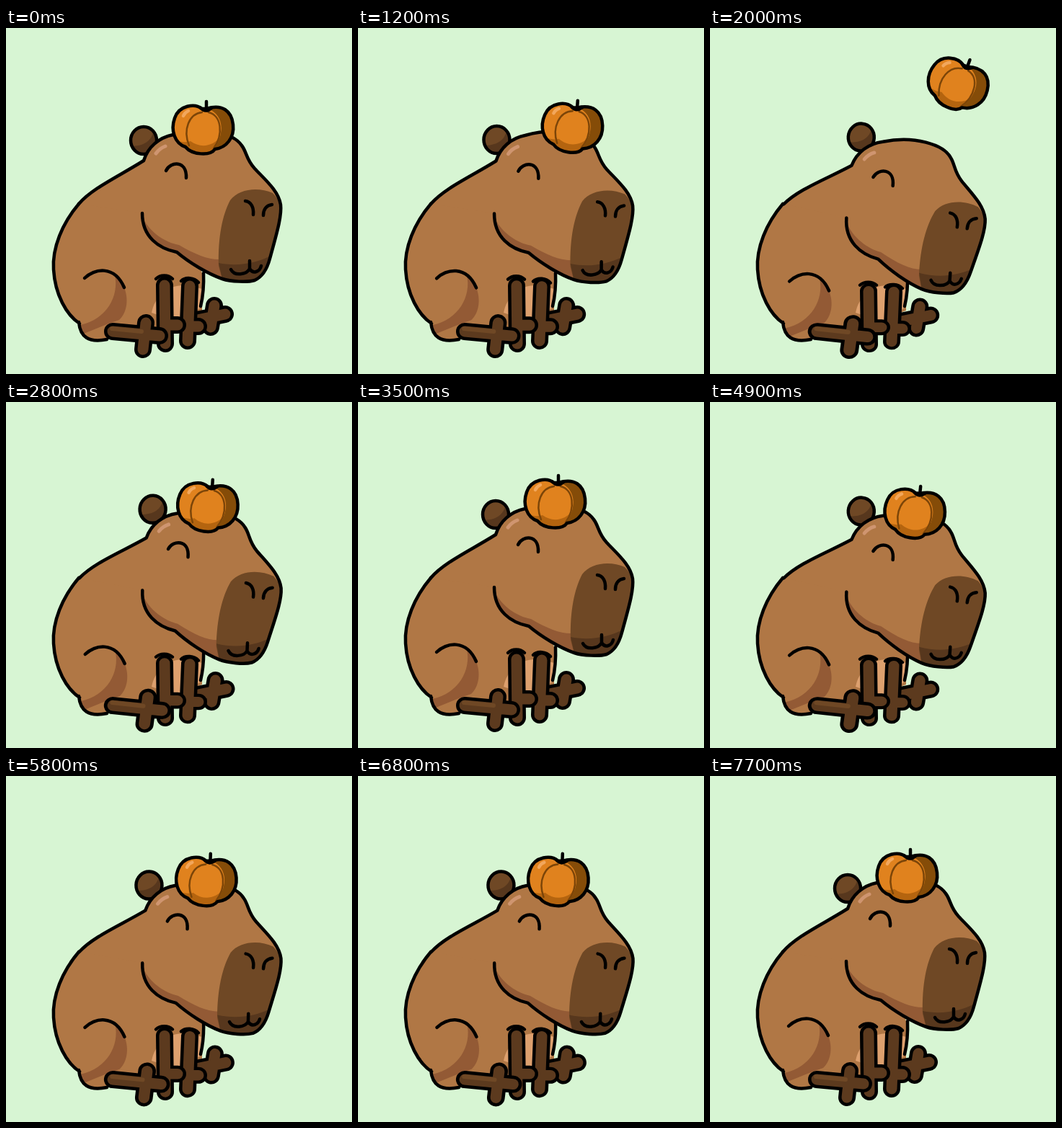
An HTML page without scripts that plays this animation: 480x480 px, repeating every 7900 ms.

```html
<!DOCTYPE html>
<html lang="en">
<head>
<meta charset="utf-8">
<title>Capybara and pumpkin</title>
<style>
@property --p { syntax: "<number>"; inherits: true; initial-value: 0; }
@property --x { syntax: "<number>"; inherits: true; initial-value: 0; }
@property --y { syntax: "<number>"; inherits: true; initial-value: 0; }
@property --r { syntax: "<number>"; inherits: true; initial-value: 0; }

html, body { margin: 0; width: 100%; height: 100%; overflow: hidden; background: #d7f5d3; }
svg {
  display: block; width: 100vw; height: 100vh;
  fill: none; stroke-linecap: round; stroke-linejoin: round;
  animation: bob 7.9s step-end infinite, toss 7.9s step-end infinite;
}
.ink { stroke: #000; stroke-width: 4.5; }
.fur { fill: #b07745; }
.belly { fill: #dda06e; }
.shade { fill: #935a35; }
.dark { fill: #6f4825; }
.deep { fill: #57371d; }
.peel { fill: #e0821e; }
.peel-low { fill: #b4640f; }
.peel-dark { fill: #854c08; }
.limb { stroke: #000; stroke-width: 24; }
.limb + .limb { stroke: #5c3a1e; stroke-width: 15; }

/* --p is how far the head has dipped, 0 to 1 */
.head { transform-origin: 98px 265px; transform: rotate(calc(var(--p) * 5.4deg)); }
.ear { transform: translate(calc(var(--p) * 14px), calc(min(1, var(--p) * 2) * -12px)); }
.legs { transform-origin: 240px 450px; transform: scaleY(calc(1 - var(--p) * .114)); }
.hind { transform-origin: 140px 420px; transform: rotate(calc(var(--p) * 1.5deg)) scaleX(calc(1 + var(--p) * .1)); }
.far { transform: translate(calc(var(--p) * 3px), calc(var(--p) * 2px)); }
.haunch { transform: translate(calc(var(--p) * 1.5px), calc(var(--p) * 6px)); }
.pumpkin {
  transform-origin: 273px 140px;
  transform: translate(calc((var(--x) + var(--p) * 3) * 1px), calc((var(--y) + var(--p) * 2) * 1px))
    rotate(calc((var(--r) + var(--p) * 2) * 1deg));
}

@keyframes bob {
  0%, 12.6%, 20.2%, 32.9%, 44.3%, 56.9%, 70.8%, 83.5%, 97.4% { --p: 0; }
  15.1%, 17.7% { --p: .06; }
  2.5%, 22.7%, 46.8%, 59.4%, 73.4%, 86% { --p: .3; }
  5%, 25.3%, 37.9%, 49.3%, 62%, 75.9%, 88.6% { --p: .75; }
  7.5%, 27.8%, 40.5%, 51.8%, 64.5%, 78.4%, 91.1% { --p: 1; }
  10.1%, 30.3%, 35.4%, 41.7%, 54.4%, 68.3%, 81%, 94.9% { --p: .5; }
}
@keyframes toss {
  0%, 32.9%, 37.9% { --x: 0; --y: 0; --r: 0; }
  12.6% { --x: 8; --y: -1; --r: 1; }
  15.1% { --x: 23; --y: -3; --r: 4; }
  17.7% { --x: 42; --y: -36; --r: 10; }
  20.2% { --x: 60; --y: -72; --r: 16; }
  22.7% { --x: 68; --y: -86; --r: 18; }
  25.3% { --x: 54; --y: -80; --r: 14; }
  27.8% { --x: 34; --y: -48; --r: 8; }
  30.3% { --x: 14; --y: -14; --r: 3; }
  35.4% { --x: -1; --y: -4; --r: 0; }
}
</style>
</head>
<body>
<svg viewBox="0 0 480 480" preserveAspectRatio="none">
  <defs>
    <path id="farFoot" d="M265 405L304 397M289 385L284 415"/>
    <path id="rightLeg" d="M255 358L252 434M258 414H267"/>
    <path id="leftLeg" d="M220 357L221 438M224 412H238"/>
    <path id="hindFoot" d="M148 421L213 427M194 409L190 446"/>
    <path id="headShape" d="M101 244C120 222 156 206 191 184C197 165 212 152 232 148C275 136 316 146 327 163C334 172 333 182 345 195C360 211 378 226 381 245C383 262 374 290 366 320C362 335 356 345 345 350C335 353 312 352 300 348C280 341 255 326 237 311C212 306 189 290 189 257"/>
    <path id="pumpkinShape" d="M272 112C262 104 240 107 234 125C228 142 234 160 249 165C258 176 283 178 290 168C306 166 317 152 315 134C313 115 300 105 278 112Z"/>
    <ellipse id="earShape" cx="191" cy="156" rx="18" ry="19"/>
    <clipPath id="inPumpkin"><use href="#pumpkinShape"/></clipPath>
    <clipPath id="inEar"><use href="#earShape"/></clipPath>
  </defs>

  <g class="head"><g class="ear">
    <use class="dark" href="#earShape"/>
    <path class="deep" clip-path="url(#inEar)" d="M205 140C203 158 190 164 172 164V180H215V140Z"/>
    <use class="ink" href="#earShape"/>
  </g></g>

  <path class="fur" d="M103 242C78 270 64 305 66 335C68 370 84 398 102 410C103 429 115 437 140 432L205 418L272 392V340L240 240Z"/>
  <path class="belly" d="M202 395C206 372 226 356 248 357L273 362L270 388L240 408Z"/>
  <g class="haunch">
    <path class="shade" d="M151 343C157 372 140 404 103 412L108 424L140 411L157 405C167 396 171 378 164 360Z"/>
    <path class="ink" d="M109 347C122 334 150 328 164 360"/>
  </g>
  <path class="ink" d="M101 244C78 271 64 305 66 335C68 370 84 398 102 410M101 408C103 429 115 437 140 432M274 340Q275 365 270 386"/>

  <g class="head">
    <use class="fur" href="#headShape"/>
    <path class="shade" d="M190 264C200 284 222 298 240 301C264 315 282 322 298 321L302 348C280 341 255 326 237 311C212 306 192 288 190 264Z"/>
    <path class="dark" d="M295 330C294 290 300 260 311 239C323 223 350 220 370 229C378 237 382 247 381 252C379 275 372 300 366 320L345 349H300Z"/>
    <path class="deep" d="M295 326C320 331 346 327 367 316C362 335 356 345 345 350C335 353 312 352 300 348Z"/>
    <use class="ink" href="#headShape"/>
    <path class="ink" d="M222 198C228 185 251 183 250 208M332 240C340 241 344 249 343 259M369 245C361 246 357 252 357 260"/>
    <path class="ink" d="M312 335C317 345 334 342 338 334V323M338 334C343 342 352 338 354 330"/>
    <path d="M208 174Q213 167 221 164" stroke="#cf9570" stroke-width="5"/>

    <g class="pumpkin">
      <use class="peel" href="#pumpkinShape"/>
      <g clip-path="url(#inPumpkin)">
        <path class="peel-low" d="M230 152C240 159 250 159 256 157C270 167 286 165 299 150L290 180H235Z"/>
        <path class="peel-dark" d="M280 112C294 117 301 130 298 146C296 158 291 165 287 171L325 165V100Z"/>
        <path d="M272 117C254 119 245 141 254 163M281 117C299 121 302 148 288 167" stroke="#7c4508" stroke-width="2.5"/>
      </g>
      <path d="M246 122Q248 117 253 115" stroke="#f2a75c" stroke-width="4.5"/>
      <use class="ink" href="#pumpkinShape"/>
      <path class="ink" d="M270 111Q277 118 285 111M278 113V102"/>
    </g>
  </g>

  <g class="far">
    <use class="limb" href="#farFoot"/><use class="limb" href="#farFoot"/>
  </g>
  <g class="legs">
    <g><use class="limb" href="#rightLeg"/><use class="limb" href="#rightLeg"/></g>
    <g><use class="limb" href="#leftLeg"/><use class="limb" href="#leftLeg"/></g>
    <path class="ink" d="M208 348C214 342 225 342 231 348M243 351C249 345 261 346 267 353"/>
  </g>
  <g class="hind">
    <use class="limb" href="#hindFoot"/><use class="limb" href="#hindFoot"/>
    <path d="M147 417L188 421" stroke="#6f4825" stroke-width="6"/>
  </g>
</svg>
</body>
</html>
```
